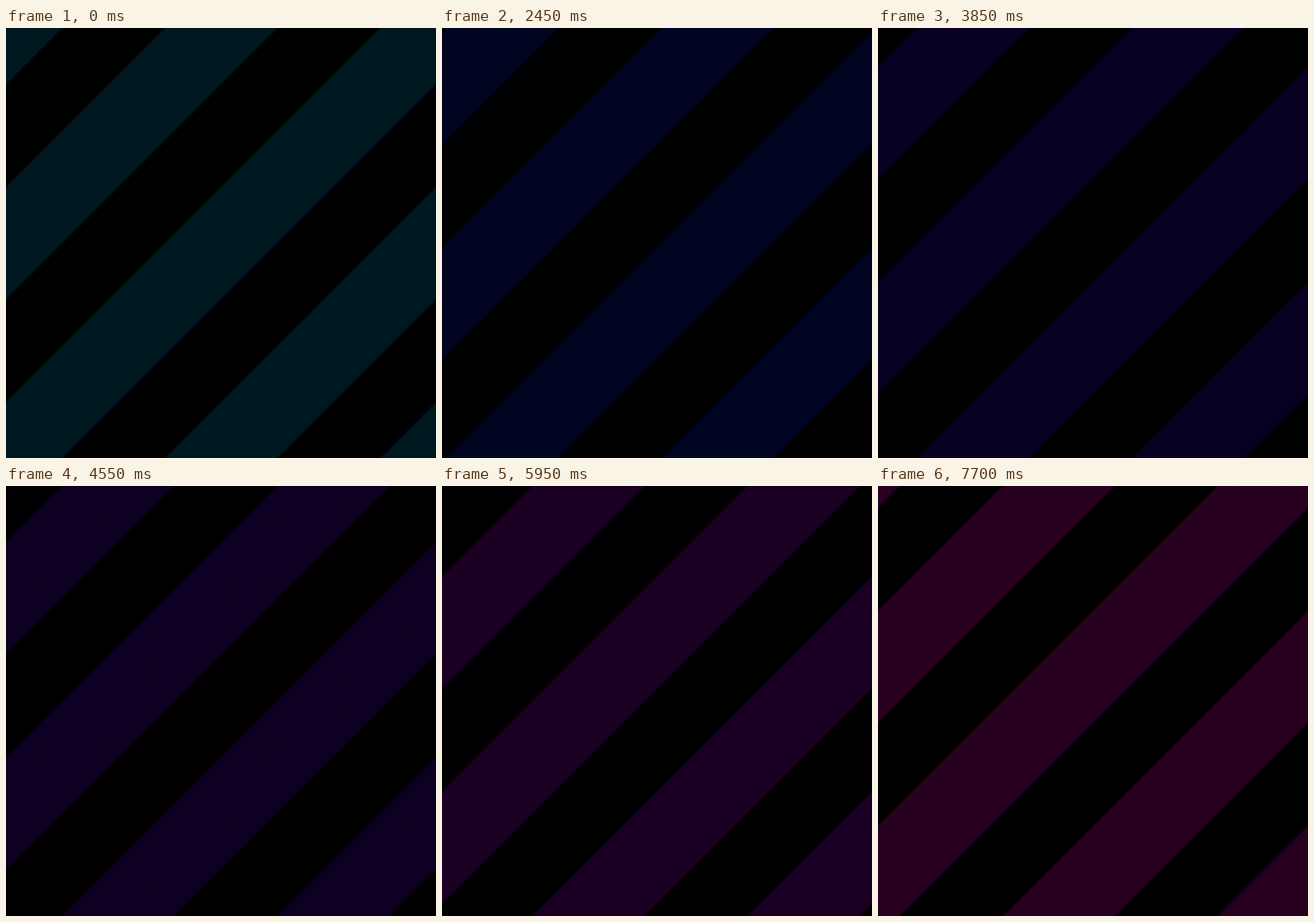
An HTML page with a canvas for the animation above (8 s loop, 560 by 560 pixels).

```html
<!DOCTYPE html>
<html lang="en">
<head>
<meta charset="utf-8">
<title>Stripes</title>
<style>
  html, body { margin: 0; width: 100%; height: 100%; overflow: hidden; background: #000; }
  canvas { display: block; width: 560px; height: 560px; }
</style>
</head>
<body>
<canvas id="stage" width="560" height="560"></canvas>
<script>
const SIZE = 560, LOOP = 8000, STEP = 350, LAST = 7700;
const PERIOD = 280, HALF = 73, SOFT = 3;
const START = 280.5, SPEED = 0.032;
const SLOW_AT = 5950, SLOW_BY = 0.0066;

const ctx = document.getElementById("stage").getContext("2d");

// Stripe centre measured along x + y; the drift eases off near the end.
const centreAt = t => START + SPEED * t - SLOW_BY * Math.max(0, t - SLOW_AT);

// Hue turns steadily from teal to plum, brightening late.
function colourAt(t) {
  const p = t / LAST;
  const hue = 195 + 117 * p;
  const light = 6.3 + 1.5 * p ** 3;
  return `hsl(${hue}, 100%, ${light}%)`;
}

function stripe(centre, colour) {
  const from = centre - HALF - SOFT, to = centre + HALF + SOFT;
  const edge = 2 * SOFT / (to - from);
  const g = ctx.createLinearGradient(from / 2, from / 2, to / 2, to / 2);
  g.addColorStop(0, "#000");
  g.addColorStop(edge, colour);
  g.addColorStop(1 - edge, colour);
  g.addColorStop(1, "#000");
  ctx.fillStyle = g;
  ctx.beginPath();
  ctx.moveTo(from, 0);
  ctx.lineTo(to, 0);
  ctx.lineTo(to - SIZE, SIZE);
  ctx.lineTo(from - SIZE, SIZE);
  ctx.fill();
}

function draw(t) {
  ctx.fillStyle = "#000";
  ctx.fillRect(0, 0, SIZE, SIZE);
  const colour = colourAt(t);
  const first = centreAt(t) % PERIOD - PERIOD;
  for (let c = first; c < 2 * SIZE + PERIOD; c += PERIOD) stripe(c, colour);
}

const start = performance.now();
function tick() {
  const t = (performance.now() - start) % LOOP;
  draw(Math.floor(t / STEP) * STEP);
  requestAnimationFrame(tick);
}
tick();
</script>
</body>
</html>
```
